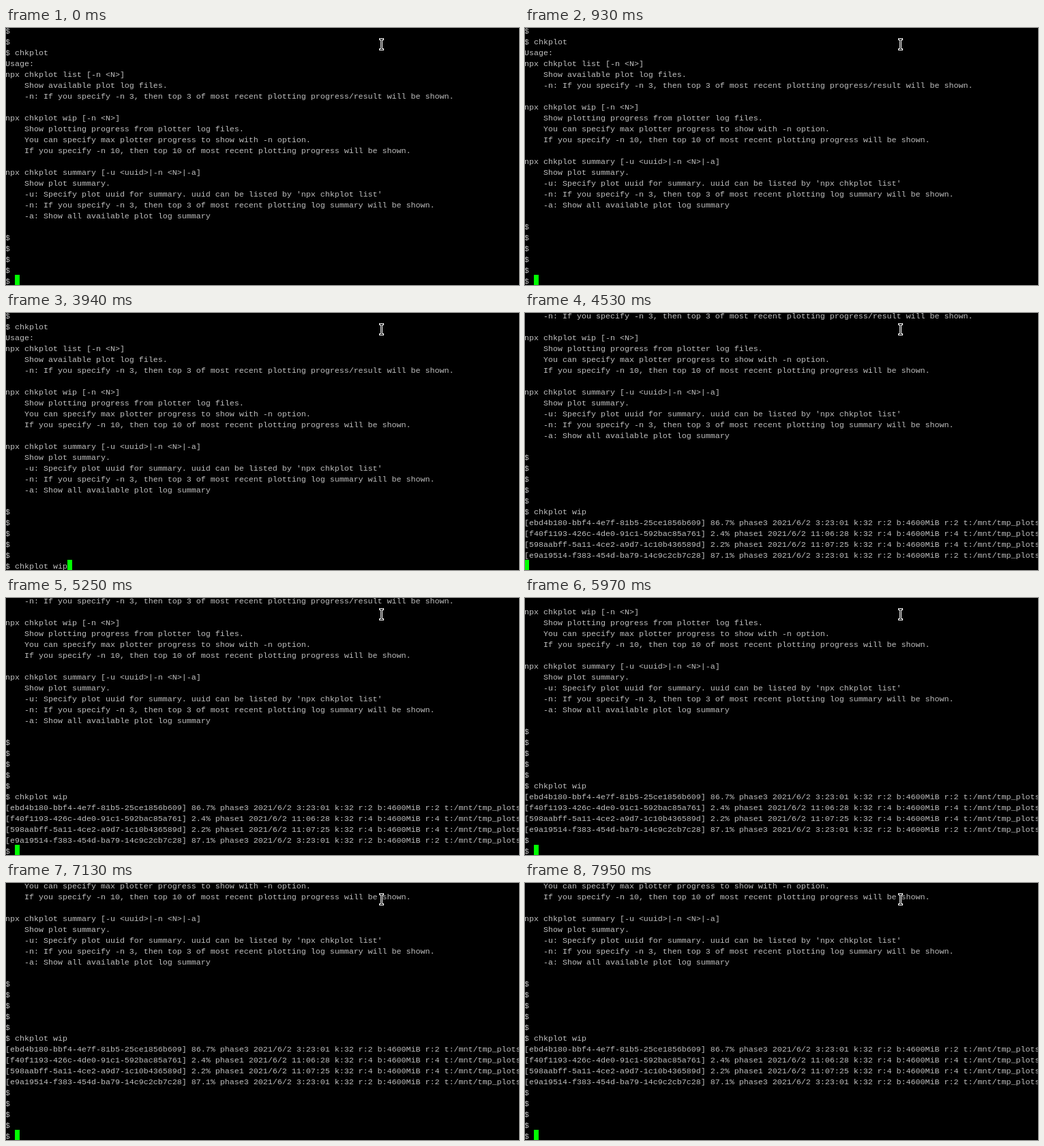
Write an HTML page that moves like this. It is 752x378 px and loops after 7.99 s.

```html
<!DOCTYPE html>
<html lang="en">
<head>
<meta charset="utf-8">
<title>Terminal</title>
<style>
  html, body { margin: 0; width: 100%; height: 100%; overflow: hidden; background: #000; }
  #stage { position: relative; width: 752px; height: 378px; overflow: hidden; background: #000; }
  #screen {
    position: absolute; left: -1px; top: -3px; margin: 0;
    font: 11.665px/16px "Liberation Mono", monospace;
    font-variant-ligatures: none; color: #bfbfbf; white-space: pre;
  }
  #caret { position: absolute; top: 363px; width: 7px; height: 16px; background: #0f0; }
  #pointer { position: absolute; left: 545px; top: 14px; }
</style>
</head>
<body>
<div id="stage">
  <pre id="screen"></pre>
  <div id="caret"></div>
  <svg id="pointer" width="12" height="21" fill="none" stroke-linecap="square">
    <path d="M3.5 2.5H7.5M5.5 2.5V17.5M3.5 17.5H7.5" stroke="#fff" stroke-width="3"/>
    <path d="M3.5 2.5H7.5M5.5 2.5V17.5M3.5 17.5H7.5" stroke="#000"/>
  </svg>
</div>
<script>
const LOOP = 7990, ROWS = 24, CELL = 7;

const opening = `$
$
$ chkplot
Usage:
npx chkplot list [-n <N>]
    Show available plot log files.
    -n: If you specify -n 3, then top 3 of most recent plotting progress/result will be shown.

npx chkplot wip [-n <N>]
    Show plotting progress from plotter log files.
    You can specify max plotter progress to show with -n option.
    If you specify -n 10, then top 10 of most recent plotting progress will be shown.

npx chkplot summary [-u <uuid>|-n <N>|-a]
    Show plot summary.
    -u: Specify plot uuid for summary. uuid can be listed by 'npx chkplot list'
    -n: If you specify -n 3, then top 3 of most recent plotting log summary will be shown.
    -a: Show all available plot log summary

$
$
$
$
$ `;

const job = (id, progress, started, threads) =>
  `[${id}] ${progress} 2021/6/2 ${started} k:32 r:${threads} b:4600MiB r:${threads} t:/mnt/tmp_plots\n`;

const report =
  job('ebd4b180-bbf4-4e7f-81b5-25ce1856b609', '86.7% phase3', '3:23:01', 2) +
  job('f40f1193-426c-4de0-91c1-592bac85a761', '2.4% phase1', '11:06:28', 4) +
  job('598aabff-5a11-4ce2-a9d7-1c10b436589d', '2.2% phase1', '11:07:25', 4) +
  job('e9a19514-f383-454d-ba79-14c9c2cb7c28', '87.1% phase3', '3:23:01', 2);

const enter = '\n$ ';

// Each step appends text to the terminal at the given time in ms.
const steps = [
  [0, opening], [30, enter],
  [2340, 'c'], [2440, 'h'], [2540, 'k'], [2600, 'p'], [2670, 'l'], [2810, 'o'],
  [2880, 't'], [2950, ' '], [3050, 'w'], [3220, 'i'], [3320, 'p'],
  [4390, '\n'], [4490, report], [4580, '$ '],
  [5880, enter], [6070, enter], [6200, enter], [6330, enter]
];

const screen = document.getElementById('screen');
const caret = document.getElementById('caret');
let shown = 0;

function draw(now) {
  const time = now % LOOP;
  const count = steps.filter(([at]) => at <= time).length;
  if (count !== shown) {
    const text = steps.slice(0, count).map(step => step[1]).join('');
    const lines = text.split('\n').slice(-ROWS);
    screen.textContent = lines.join('\n');
    caret.style.left = lines[lines.length - 1].length * CELL - 1 + 'px';
    shown = count;
  }
}

const start = performance.now();
function tick() {
  draw(performance.now() - start);
  requestAnimationFrame(tick);
}
tick();
</script>
</body>
</html>
```
